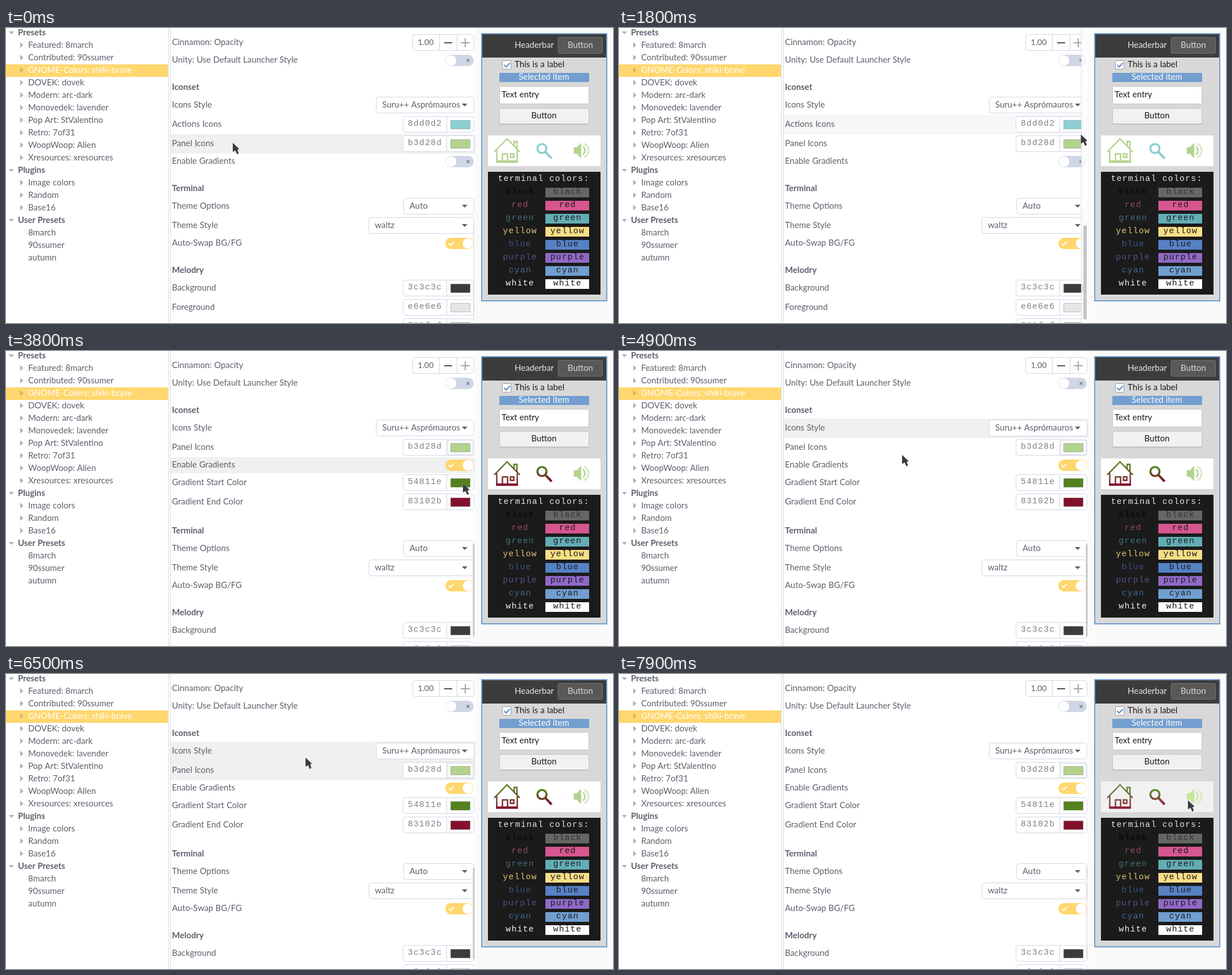
These frames come from a looping animation (1068 px wide and 519 px high, 8 s). An HTML page:

```html
<!DOCTYPE html>
<html lang="en">
<head>
<meta charset="utf-8">
<title>Theme settings</title>
<style>
html, body { margin: 0; width: 100%; height: 100%; overflow: hidden; background: #fff; }
svg { display: block; }
text { font: 14.85px Lato, sans-serif; word-spacing: .4px; fill: #5c616c; white-space: pre; }
.b { font-weight: 700; }
.m { font: 14.8px "Liberation Mono", monospace; letter-spacing: 1.18px; word-spacing: 0; fill: #7c8087; }
.num { font-size: 14.2px; }
</style>
</head>
<body>
<svg id="stage" width="1068" height="519" viewBox="0 0 1068 519"></svg>
<script>
const LINE = '#cfd6e6', GREY = '#5c616c', GOLD = '#ffd76e', BLUE = '#729fcf';

const rect = (x, y, w, h, fill, more = '') =>
  `<rect x="${x}" y="${y}" width="${w}" height="${h}" fill="${fill}" ${more}/>`;
const path = (d, more) => `<path d="${d}" ${more}/>`;
const text = (x, y, str, more = '') => `<text x="${x}" y="${y}" ${more}>${str}</text>`;
const group = (id, body, more = '') => `<g id="${id}" ${more}>${body}</g>`;
const line = (d, color, width, more = '') =>
  path(d, `fill="none" stroke="${color}" stroke-width="${width}" ${more}`);

// Settings widgets; c is the middle of the row.
const label = (c, str) => text(292, c + 5, str);
const title = (c, str) => text(292, c + 5, str, 'class="b"');
const hover = (id, y, h) => rect(290, y, 536, h, '#f0f0f0', `id="${id}"`);
const frame = (x, c) =>
  rect(x + .5, c - 13.5, 823 - x, 28, '#fff', `rx="4" stroke="${LINE}"`);

function combo(c, x, name, value) {
  return label(c, name) + frame(x, c) + text(x + 11, c + 5, value) +
    path(`M802 ${c - 2}h10l-5 5z`, `fill="${GREY}"`);
}
function color(c, name, hex) {
  return label(c, name) + frame(698, c) +
    line(`M775.5 ${c - 13}v27`, LINE, 1) +
    text(707, c + 2.5, hex, 'class="m"') +
    rect(782.5, c - 6.5, 34, 15, '#' + hex, 'stroke="#000" stroke-opacity=".22"');
}
function toggle(c, on) {
  const y = c + 1;
  const mark = on
    ? line(`M779 ${y}l3 3l6 -6`, '#fff', 2)
    : line(`M810.5 ${y - 2.5}l5 5m0 -5l-5 5`, '#7b808b', 1.7);
  return rect(773, y - 10, 50, 20, on ? GOLD : LINE, 'rx="10"') + mark +
    `<circle cx="${on ? 813 : 783}" cy="${y}" r="9.3" fill="#fff"/>`;
}

function tree() {
  const rows = ['*Presets', 'Featured: 8march', 'Contributed: 90ssumer',
    'GNOME-Colors: shiki-brave', 'DOVEK: dovek', 'Modern: arc-dark',
    'Monovedek: lavender', 'Pop Art: StValentino', 'Retro: 7of31', 'WoopWoop: Alien',
    'Xresources: xresources', '*Plugins', 'Image colors', 'Random', 'Base16',
    '*User Presets', '8march', '90ssumer', 'autumn'];
  let out = rect(0, 64, 285, 22, GOLD);
  rows.forEach((str, i) => {
    const y = 8 + 22 * i;
    if (str[0] === '*') {
      out += path(`M5 ${y - 2}h9l-4.5 5z`, 'fill="#aeb1b7"') +
        text(21, y + 5, str.slice(1), 'class="b"');
      return;
    }
    const picked = i === 3;
    if (i < 15) out += path(`M25 ${y - 5}v10l5.5 -5z`, `fill="${picked ? '#cbb37a' : '#aeb1b7'}"`);
    out += text(39, y + 5, str, picked ? 'style="fill:#fff"' : '');
  });
  return out + rect(285, 0, 5, 519, '#fafafb') +
    line('M285.5 0V519M289.5 0V519', '#dcdde0', 1);
}

function settings() {
  const spin = label(25, 'Cinnamon: Opacity') + frame(715, 25) +
    line('M762.5 12v27M793.5 12v27', LINE, 1) +
    text(724.5, 30, '1.00', 'class="num"') +
    line('M771 26h14', '#4c505a', 2) + line('M800 26h16M808 18v16', '#a4a7ad', 2);
  return text(342, -3, 'p') + spin +
    label(56, 'Unity: Use Default Launcher Style') + toggle(56, false) +
    title(104, 'Iconset') +
    hover('hStyle', 119, 34) + combo(135, 651, 'Icons Style', 'Suru++ Asprómauros') +
    group('actions', hover('hActions', 153, 34) + color(169, 'Actions Icons', '8dd0d2')) +
    group('moved',
      hover('hPanel', 187, 34) + color(203, 'Panel Icons', 'b3d28d') +
      rect(777.5, 191.5, 44, 25, 'none', 'id="focus" stroke="#b9bbc0" stroke-dasharray="1 1"') +
      hover('hEnable', 221, 28) + label(234, 'Enable Gradients') +
      group('off', toggle(234, false)) + group('on', toggle(234, true))) +
    group('ends', color(231, 'Gradient Start Color', '54811e') +
      color(265, 'Gradient End Color', '83102b')) +
    group('rest', title(282, 'Terminal') +
      combo(313, 699, 'Theme Options', 'Auto') + combo(347, 638, 'Theme Style', 'waltz') +
      label(378, 'Auto-Swap BG/FG') + toggle(378, true) +
      title(426, 'Melodry') + color(457, 'Background', '3c3c3c') +
      color(491, 'Foreground', 'e6e6e6') + color(525, 'Accent Color', '729fcf')) +
    group('trough', rect(814, 0, 12, 519, '#fdfdfd', 'fill-opacity=".85"') +
      line('M813.5 0V519', '#dcdde0', 1)) +
    rect(0, 0, 3, 1, '#c5c5c7', 'id="thumb" rx="1.5"');
}

function terminal() {
  const rows = [['black', '#0b0b0b', '#666'], ['red', '#934b69', '#d6568f'],
    ['green', '#426f79', '#63adb5'], ['yellow', '#dcc573', '#f8de86'],
    ['blue', '#3b5382', '#5681c4'], ['purple', '#604b88', '#9069c8'],
    ['cyan', '#416894', '#709fd0'], ['white', '#f2f2f2', '#fff']];
  const mid = 'text-anchor="middle"';
  let out = rect(848, 253, 198, 216, '#1b1b1b') +
    text(865.5, 269, 'terminal colors:', 'class="m" style="fill:#e6e6e6"');
  rows.forEach(([name, ink, fill], i) => {
    const y = 292 + 23 * i;
    out += text(904.5, y, name, `class="m${i ? '' : ' b'}" ${mid} style="fill:${ink}${i ? '' : ';font-weight:700'}"`) +
      rect(949, y - 11, 77, 17, fill) +
      text(988, y, name, `class="m" ${mid} style="fill:${i ? '#1b1b1b' : '#333'}"`);
  });
  return out;
}

function icons() {
  const house = line('M859 218L881.5 195L904 218M863.5 215V236H899.5V215' +
    'M894 207V199.5H899V212M873.5 236V221.5H882.5V236M887.5 221.5h6v6h-6z', 'currentColor', 2.4) +
    rect(862.5, 233, 38, 4, 'currentColor');
  const lens = '<circle cx="943" cy="212" r="8" fill="none" stroke="currentColor" stroke-width="3.6"/>' +
    line('M949 218L960 229.5', 'currentColor', 4);
  const horn = path('M999 210h5l8 -8v27l-8 -8h-5z', 'fill="currentColor"') +
    line('M1015 208.5a8.5 8.5 0 0 1 0 14', 'currentColor', 2.6, 'opacity=".95"') +
    line('M1017 203.5a13 13 0 0 1 0 24', 'currentColor', 3, 'opacity=".5"');
  const paint = (body, ref) => body.replaceAll('currentColor', ref);
  return rect(848, 189, 198, 54, '#fff', 'id="tray"') +
    group('house', house) + group('lens', lens) + group('horn', horn) +
    group('gradIcons', paint(house, 'url(#gHouse)') + paint(lens, 'url(#gLens)'));
}

function preview() {
  const ink = 'style="fill:#1b1b1b"', mid = 'text-anchor="middle"';
  return rect(826, 0, 242, 519, '#fafafb') +
    rect(837, 10, 220, 470, '#d8d8d8', `stroke="${BLUE}" stroke-width="2"`) +
    rect(838, 11, 218, 41, '#3c3c3c') +
    text(895, 35, 'Headerbar', 'style="fill:#e6e6e6"') +
    rect(971.5, 16.5, 78, 28, '#585858', 'rx="2" stroke="#747474"') +
    text(1010.5, 35, 'Button', `${mid} style="fill:#d8d8d8"`) +
    rect(873.5, 57.5, 15, 15, '#fff', 'rx="1" stroke="#9a9a9a"') +
    line('M876.5 65l3.5 3.5l6.5 -7', '#6596cc', 2.4) +
    text(895, 69, 'This is a label', ink) +
    rect(868, 79, 158, 16, BLUE) +
    text(946.5, 91, 'Selected item', `${mid} style="fill:#fff"`) +
    rect(868.5, 102.5, 157, 31, '#fff', 'rx="1" stroke="#c4c4c4"') +
    text(872, 122, 'Text entry', ink) +
    rect(868, 142, 158, 28, '#bcbcbc', 'rx="2"') +
    rect(868.5, 141.5, 157, 27, '#f1f1f1', 'rx="2" stroke="#c4c4c4"') +
    text(946.5, 159, 'Button', `${mid} ${ink}`) + icons() + terminal();
}

const fade = (id, y1, y2) =>
  `<linearGradient id="${id}" gradientUnits="userSpaceOnUse" x1="0" x2="0" y1="${y1}" y2="${y2}">` +
  '<stop offset=".1" stop-color="#54811e"/><stop offset=".9" stop-color="#83102b"/></linearGradient>';

const stage = document.getElementById('stage');
stage.innerHTML = `<defs>${fade('gHouse', 194, 238)}${fade('gLens', 202, 231)}</defs>` +
  settings() + tree() + preview() +
  path('M0 0V16L4.5 13.5L7.5 20L10.5 18.6L8 12.3L11.5 11Z',
    'id="cursor" fill="#3b3c40" stroke="#fff" stroke-opacity=".75" stroke-width=".8" paint-order="stroke"');

const el = {};
stage.querySelectorAll('[id]').forEach(n => el[n.id] = n);

// time, x, y of the pointer tip
const route = [[0, 399, 202], [500, 399, 202], [900, 816, 166], [1100, 768, 159],
  [1400, 772, 163], [2100, 839, 203], [2400, 841, 204], [3000, 841, 204], [3100, 808, 235],
  [3300, 808, 235], [3500, 804, 233], [4300, 804, 233], [5200, 391, 165], [5700, 802, 171],
  [5800, 782, 172], [6100, 716, 176], [6500, 527, 147], [6900, 275, 174], [7000, 295, 172],
  [7900, 1001, 222], [8000, 1001, 222]];
const hovers = {
  hStyle: [[4700, 5000], [6200, 6600]],
  hActions: [[900, 1700]],
  hPanel: [[-500, 700], [5000, 6550], [6700, 7200]],
  hEnable: [[3100, 4500]]
};
const barKeys = [[0, .3], [400, 0], [500, 0], [800, 1], [7000, 1], [7900, .35], [8000, .35]];

const clamp = v => Math.max(0, Math.min(1, v));
const ramp = (t, [a, b]) => Math.min(clamp((t - a) / 200), clamp((b + 200 - t) / 200));

function at(keys, t, ease = k => k) {
  const i = Math.max(1, keys.findIndex(k => k[0] >= t));
  const a = keys[i - 1], b = keys[i];
  const k = ease((t - a[0]) / (b[0] - a[0]));
  return a.slice(1).map((v, n) => v + (b[n + 1] - v) * k);
}
const show = (node, yes) => node.setAttribute('visibility', yes ? 'visible' : 'hidden');
const shift = (node, y) => node.setAttribute('transform', `translate(0 ${y})`);

function draw(t) {
  const open = t >= 3700, wide = t >= 800 && t < 1900;
  const [x, y] = at(route, t, k => k * k * (3 - 2 * k));
  el.cursor.setAttribute('transform', `translate(${x} ${y})`);

  for (const id in hovers)
    el[id].setAttribute('opacity', Math.max(...hovers[id].map(span => ramp(t, span))));

  show(el.actions, !open);
  show(el.off, !open);
  [el.on, el.ends, el.focus].forEach(n => show(n, open));
  shift(el.moved, open ? -34 : 0);
  shift(el.rest, open ? 34 : 0);

  show(el.trough, wide);
  const bar = { x: wide ? 817 : 821.5, y: open ? 340 : 347, width: wide ? 6 : 3,
    height: open ? 162 : 166, rx: wide ? 3 : 1.5, opacity: at(barKeys, t)[0] };
  for (const k in bar) el.thumb.setAttribute(k, bar[k]);

  const lit = (t >= 2100 && t < 3100) || t >= 7700, mixed = t >= 3800;
  el.tray.setAttribute('fill', lit ? '#f1f1f1' : '#fff');
  const green = lit ? '#c3e69b' : '#b3d28d';
  el.house.style.color = el.horn.style.color = green;
  el.lens.style.color = lit ? '#85dce0' : '#8dd0d2';
  show(el.house, !mixed);
  show(el.lens, !mixed);
  show(el.gradIcons, mixed);
  el.gradIcons.setAttribute('opacity', lit ? .9 : 1);
}

const start = performance.now();
function tick() {
  const t = (performance.now() - start) % 8000;
  draw(Math.floor(t / 100) * 100);
  requestAnimationFrame(tick);
}
tick();
</script>
</body>
</html>
```
